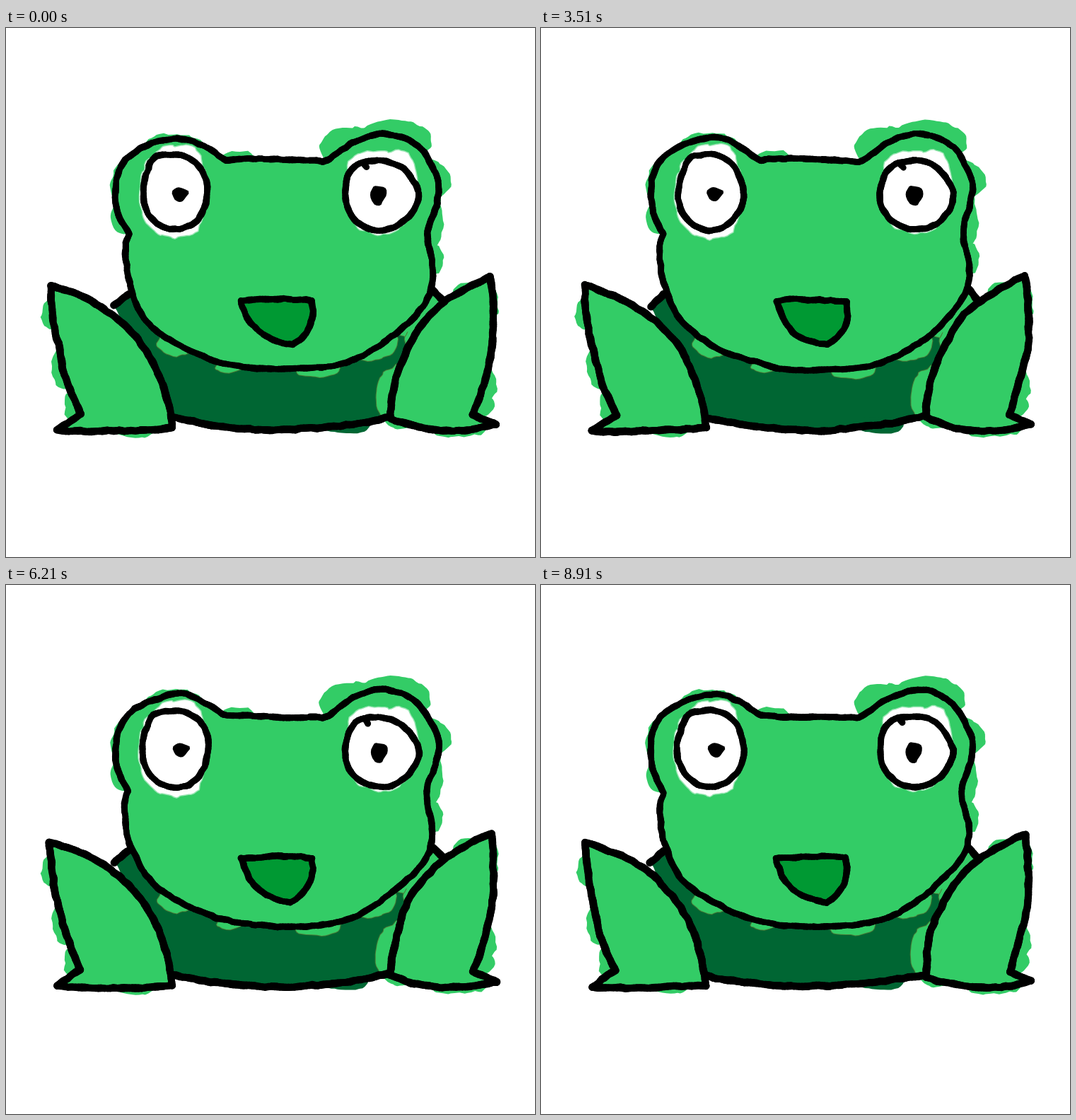
These frames come from a looping animation (748 by 748 pixels, 9.03 s). An HTML page with a canvas:

```html
<!DOCTYPE html>
<html lang="en">
<head>
<meta charset="utf-8">
<title>Frog</title>
<style>
html, body { margin: 0; width: 100%; height: 100%; overflow: hidden; background: #fff; }
canvas { display: block; width: 100%; height: 100%; }
</style>
</head>
<body>
<canvas id="stage" width="748" height="748"></canvas>
<script>
const ctx = document.getElementById('stage').getContext('2d');
const LOOP = 9030, STEP = 180, LEAD = 90;
const LIGHT = '#33cc66', DARK = '#006633', MOUTH = '#009933', EDGE = '#4a7a35';
let pose = 0;

function hash(x, y, s) {
  let h = Math.imul(x, 374761393) + Math.imul(y, 668265263) + Math.imul(s, 1274126177) | 0;
  h = Math.imul(h ^ (h >>> 13), 1103515245);
  h = Math.imul(h ^ (h >>> 16), 2246822519);
  return ((h ^ (h >>> 15)) >>> 0) / 4294967296;
}

// Smooth noise in -0.5..0.5
function noise(x, y, seed) {
  const i = Math.floor(x), j = Math.floor(y);
  const ease = v => v * v * (3 - 2 * v);
  const u = ease(x - i), v = ease(y - j);
  const row = k => hash(i, k, seed) * (1 - u) + hash(i + 1, k, seed) * u;
  return row(j) * (1 - v) + row(j + 1) * v - 0.5;
}

// Slow warp shared by everything, plus fine grain along each edge.
function warp([x, y], grain, seed) {
  const a = 4, w = 50, g = 8;
  return [
    x + a * noise(x / w, y / w, pose * 2 + 11) + grain * noise(x / g, y / g, seed),
    y + a * noise(x / w, y / w, pose * 2 + 12) + grain * noise(x / g, y / g, seed + 1)
  ];
}

const sample = (n, f) => Array.from({ length: n + 1 }, (_, i) => f(i / n));

// Parabolic arc from a to b that swells by `bulge` to the left of its direction.
function arc(a, b, bulge = 0) {
  const dx = b[0] - a[0], dy = b[1] - a[1], len = Math.hypot(dx, dy);
  return sample(Math.ceil(len / 4), t => {
    const k = 4 * t * (1 - t) * bulge / len;
    return [a[0] + dx * t + dy * k, a[1] + dy * t - dx * k];
  });
}

// Closed shape from corners [x, y, bulge of the side that follows].
const loop = corners => corners.flatMap((c, i) => arc(c, corners[(i + 1) % corners.length], c[2]));

// Ellipse; each bump is [angle, height, width].
const oval = (cx, cy, rx, ry, bumps = []) => sample(Math.ceil((rx + ry) * 0.8), t => {
  const a = (t * 2 - 1) * Math.PI;
  const r = bumps.reduce((s, [at, h, w]) => s + h * Math.exp(-(((a - at) / w) ** 2)), 1);
  return [cx + rx * r * Math.cos(a), cy + ry * r * Math.sin(a)];
});

// Smooth curve through points.
const curve = p => p.slice(1).flatMap((c, i) => {
  const a = p[i - 1] || p[i], b = p[i], d = p[i + 2] || c;
  return sample(Math.ceil(Math.hypot(c[0] - b[0], c[1] - b[1]) / 4), t => [0, 1].map(m =>
    b[m] + 0.5 * t * (c[m] - a[m] +
      t * (2 * a[m] - 5 * b[m] + 4 * c[m] - d[m] + t * (3 * (b[m] - c[m]) + d[m] - a[m])))));
});

const head = curve([
  [174, 292], [158, 255], [160, 203], [190, 170], [244, 155], [285, 168], [308, 184], [330, 185],
  [430, 187], [453, 186], [490, 161], [532, 149], [580, 166], [609, 213], [607, 250], [596, 291],
  [604, 355], [578, 408], [490, 470], [385, 483], [290, 469], [210, 425], [175, 365], [169, 315], [174, 292]
]);
const armL = loop([[62, 364, 45], [235, 566, 3], [72, 568, 0], [106, 546, 10]]);
const armR = loop([[685, 351, 14], [661, 547, 0], [693, 560, 13], [544, 552, 40]]);
const body = loop([[155, 396, 0], [173, 375, 0], [300, 440, 0], [588, 430, 0], [544, 550, 18], [237, 552, 0]]);
const mouth = loop([[332, 386, 2], [431, 386, 12], [403, 449, 16]]);
const belly = arc([544, 549], [237, 552], 18);
const shoulders = [arc([153, 393], [173, 376]), arc([604, 371], [619, 387])];
const eyes = [
  oval(240, 232, 46, 54, [[-2.2, 0.12, 0.3]]),
  oval(530, 237, 50, 49, [[-2.3, 0.12, 0.5], [0, 0.07, 0.3]])
];
const whites = [
  oval(237, 232, 48, 66, [[-0.9, 0.12, 0.4], [0.9, 0.08, 0.3]]),
  oval(531, 234, 51, 58, [[-2.3, 0.17, 0.4], [-0.85, 0.2, 0.4]])
];
const pupils = [oval(247, 234, 10.5, 11.5), oval(527, 236, 11, 14)];

// Loose paint that spills past the outlines.
const headSpill = [
  oval(548, 160, 53, 30), oval(490, 167, 47, 29), oval(600, 215, 29, 27), oval(600, 270, 18, 40),
  oval(600, 327, 19, 26), oval(166, 220, 16, 30), oval(166, 270, 17, 22), oval(237, 165, 40, 16),
  oval(327, 184, 26, 11), oval(240, 446, 25, 18), oval(318, 479, 20, 8), oval(437, 477, 37, 19),
  oval(515, 448, 38, 22), oval(572, 414, 32, 24), oval(597, 392, 14, 20)
];
const armSpill = [
  oval(63, 403, 14, 23), oval(85, 478, 20, 30), oval(100, 535, 17, 28), oval(183, 569, 30, 11),
  oval(679, 390, 18, 35), oval(674, 505, 20, 27), oval(672, 532, 19, 16), oval(640, 569, 38, 10),
  oval(652, 370, 20, 11), oval(560, 522, 37, 46), oval(592, 442, 28, 26)
];
const bodySpill = oval(480, 562, 32, 12);

function trace(points, grain = 3) {
  const path = new Path2D();
  points.forEach(p => path.lineTo(...warp(p, grain, 3)));
  path.closePath();
  return path;
}

function fill(points, color, grain) {
  ctx.fillStyle = color;
  ctx.fill(trace(points, grain));
}

// Light paint, with a thin rim where it meets the dark body.
function paint(shapes, spill) {
  ctx.save();
  ctx.clip(trace(body));
  ctx.strokeStyle = EDGE;
  ctx.lineWidth = 2;
  spill.forEach(s => ctx.stroke(trace(s, 5)));
  ctx.restore();
  spill.forEach(s => fill(s, LIGHT, 5));
  shapes.forEach(s => fill(s, LIGHT));
}

function eyeWhite(points) {
  fill(points, '#fff', 5);
  ctx.strokeStyle = 'rgba(255,255,255,0.5)';
  ctx.lineWidth = 3;
  ctx.stroke(trace(points, 5));
}

function ink(points, width) {
  const line = points.map(p => warp(p, 2, pose * 2 + 301));
  ctx.strokeStyle = '#000';
  line.slice(1).forEach(([x, y], i) => {
    ctx.lineWidth = width + 2 * noise(x / 6, y / 6, pose + 501);
    ctx.beginPath();
    ctx.moveTo(...line[i]);
    ctx.lineTo(x, y);
    ctx.stroke();
  });
}

function draw() {
  ctx.fillStyle = '#fff';
  ctx.fillRect(0, 0, 748, 748);
  ctx.lineCap = ctx.lineJoin = 'round';

  fill(body, DARK);
  fill(bodySpill, DARK);
  paint([head], headSpill);
  paint([armL, armR], armSpill);
  whites.forEach(eyeWhite);
  fill(mouth, MOUTH);

  [head, mouth, ...eyes].forEach(p => ink(p, 9));
  [armL, armR, belly, ...shoulders].forEach(p => ink(p, 10.5));
  ink(arc([506, 190], [511, 196]), 9);
  pupils.forEach(p => fill(p, '#000', 5));
}

const start = performance.now();
let last = -1;
function tick() {
  const t = (performance.now() - start) % LOOP;
  pose = Math.floor((t + LEAD) / STEP);
  if (pose !== last) {
    last = pose;
    draw();
  }
  requestAnimationFrame(tick);
}
tick();
</script>
</body>
</html>
```
